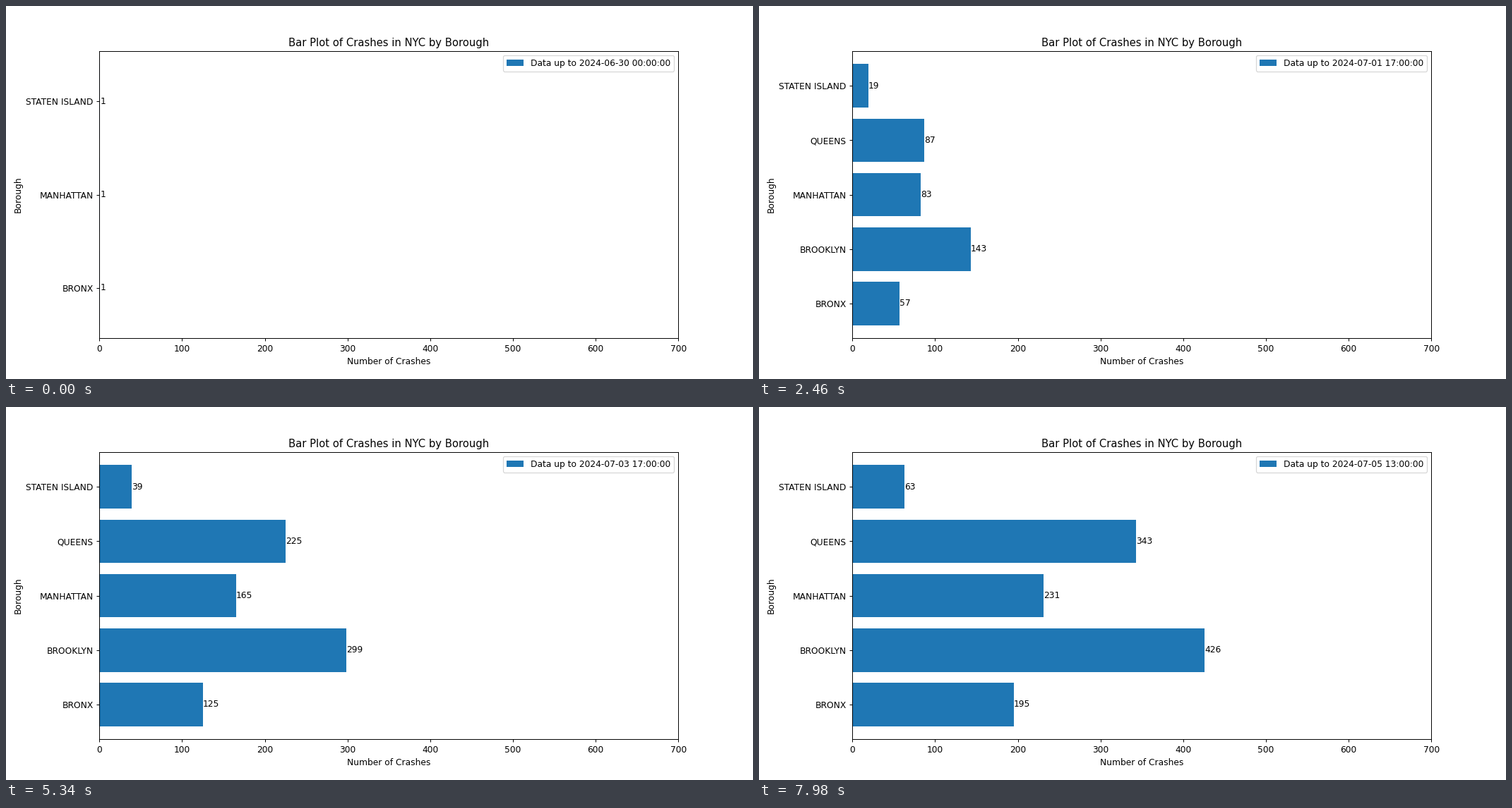
A matplotlib script that plays this animation: 1058 px wide and 529 px high, repeating every 8 s.

```python
import numpy as np
import matplotlib.pyplot as plt
from matplotlib.animation import FuncAnimation

WIDTH, HEIGHT = 1058, 529
STEP_MS, TICK_MS, LOOP_MS = 60, 20, 8000
START = np.datetime64("2024-06-30T00")

# Crash totals at four key hours; they grow steadily in between.
KEY_HOURS = 0, 41, 89, 133
TOTALS = {
    "BRONX": (1, 57, 125, 195),
    "BROOKLYN": (0, 143, 299, 426),
    "MANHATTAN": (1, 83, 165, 231),
    "QUEENS": (0, 87, 225, 343),
    "STATEN ISLAND": (1, 19, 39, 63),
}


def count_at(name, hour):
    return round(float(np.interp(hour, KEY_HOURS, TOTALS[name])))


fig, ax = plt.subplots(figsize=(12, 6), dpi=WIDTH / 12)
drop = 0.4 / HEIGHT  # the axes sit a fraction of a pixel below the default
fig.subplots_adjust(left=0.125, right=0.9, bottom=0.11 - drop, top=0.88 - drop)
bars = ax.barh(range(len(TOTALS)), [0] * len(TOTALS), color="#1f77b4",
               label="Data up to")
labels = [ax.text(0, 0, "", ha="left", va="center") for _ in TOTALS]
ax.set_xlim(0, 700)
ax.set_title("Bar Plot of Crashes in NYC by Borough")
ax.set_xlabel("Number of Crashes")
ax.set_ylabel("Borough")
caption = ax.legend(loc="upper right").get_texts()[0]


def set_categories(names):
    ax.set_yticks(range(len(names)), names)
    margin = 0.05 * (len(names) - 0.2)
    ax.set_ylim(-0.4 - margin, len(names) - 0.6 + margin)


def update(frame):
    hour = frame * TICK_MS // STEP_MS
    counts = {name: count_at(name, hour) for name in TOTALS}
    shown = [name for name in counts if counts[name] > 0]
    if len(ax.get_yticks()) != len(shown):
        set_categories(shown)

    for (name, count), bar, label in zip(counts.items(), bars, labels):
        bar.set_visible(count > 0)
        label.set_visible(count > 0)
        if count > 0:
            row = shown.index(name)
            bar.set_y(row - 0.4)
            bar.set_width(count)
            label.set_position((count, row))
            label.set_text(str(count))

    stamp = str(START + np.timedelta64(hour, "h")).replace("T", " ")
    caption.set_text(f"Data up to {stamp}:00:00")
    return [*bars, *labels, caption]


set_categories(list(TOTALS))
anim = FuncAnimation(fig, update, frames=LOOP_MS // TICK_MS, interval=TICK_MS,
                     repeat=True, repeat_delay=0)
plt.show()
```
